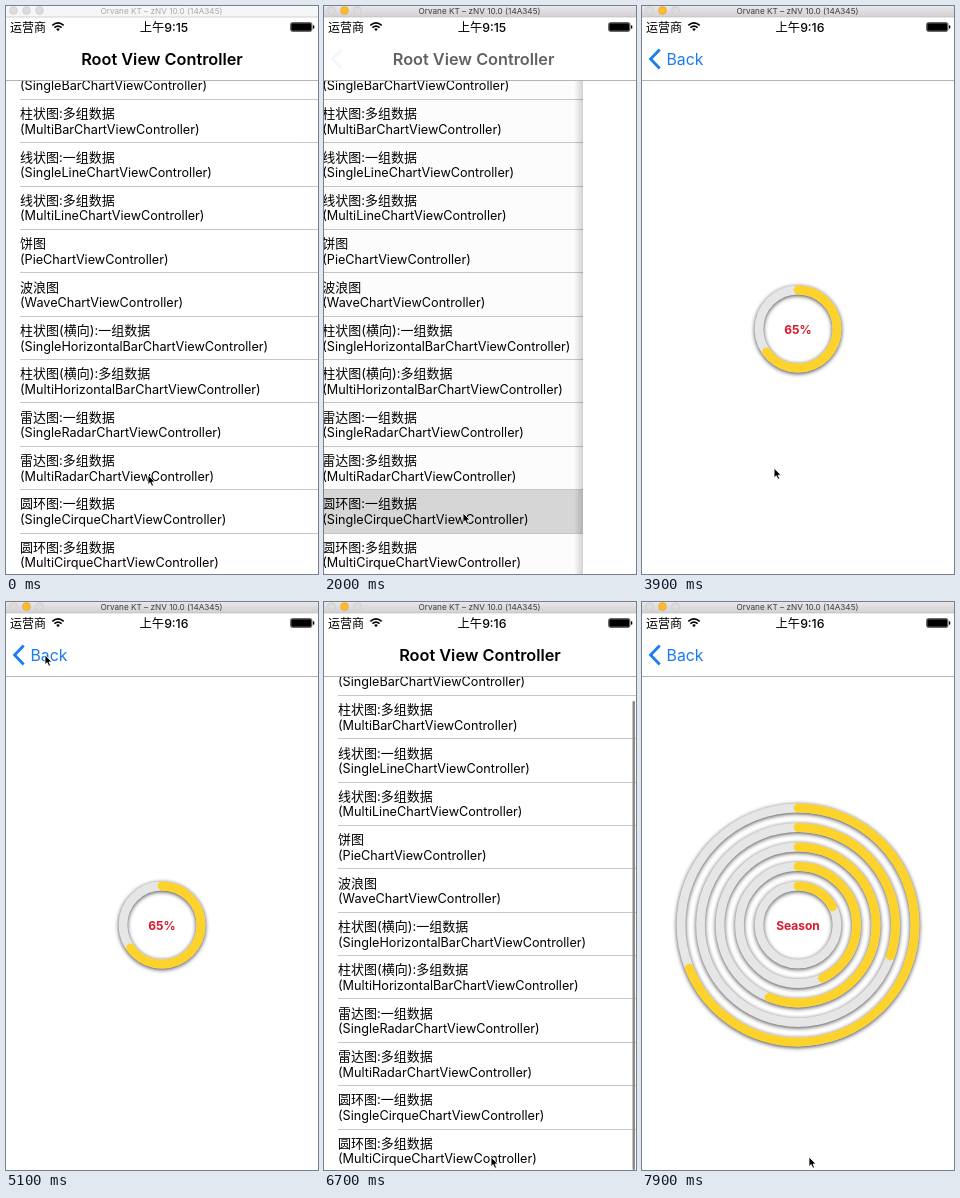
An HTML page that plays this animation: 312x568 px, repeating every 8 s.

```html
<!DOCTYPE html>
<html lang="zh">
<head>
<meta charset="utf-8">
<style>
html, body { margin: 0; width: 100%; height: 100%; overflow: hidden; background: #fff; }
svg { display: block; font-family: Inter, "Noto Sans CJK SC", "Noto Sans CJK", sans-serif; }
.mid { text-anchor: middle; }
.ring { filter: drop-shadow(.8px 1.5px 2px #000b); }
</style>
</head>
<body>
<svg id="stage" width="312" height="568" viewBox="0 0 312 568">
  <defs>
    <linearGradient id="edge"><stop stop-color="#000" stop-opacity="0"/><stop offset="1" stop-color="#000" stop-opacity=".2"/></linearGradient>
    <linearGradient id="chrome" x2="0" y2="1"><stop stop-color="#e9e7e9"/><stop offset="1" stop-color="#d2d0d2"/></linearGradient>
  </defs>
  <rect width="312" height="568" fill="#fff"/>
  <g id="list"><rect id="mark" width="312" height="43.4" fill="#d9d9d9"/></g>
  <rect id="dim" y="74" width="312" height="494"/>
  <rect id="bar" x="308.5" y="99" width="2.5" height="469" rx="1.2" fill="#8b8b8f"/>
  <g id="page">
    <rect id="shade" x="-9" y="74" width="9" height="494" fill="url(#edge)"/>
    <rect y="74" width="312" height="494" fill="#fff"/>
    <g id="single"></g>
    <g id="multi"></g>
    <text id="label" class="mid" x="156" y="328" font-size="12" font-weight="700" fill="#d9182b"></text>
  </g>
  <rect width="312" height="74" fill="#fff"/>
  <path d="M0 74.5H312" stroke="#b4b4b6"/>
  <text id="title" class="mid" x="156" y="58.7" font-size="16.3" font-weight="600">Root View Controller</text>
  <path id="chevron" d="M17.7 43.5L8.6 53L17.7 62.5" fill="none" stroke="#1a7cf0" stroke-width="2.8"/>
  <text id="back" x="24.5" y="58.8" font-size="15.8" fill="#1a7cf0">Back</text>
  <text x="4" y="25.6" font-size="12">运营商</text>
  <g fill="none" stroke="#000" stroke-width="1.7">
    <path d="M46.3 19.3Q52 14.6 57.7 19.3M48.4 21.7Q52 18.7 55.6 21.7"/>
    <path d="M50.2 23L52 25.3L53.8 23Q52 21.6 50.2 23Z" fill="#000" stroke="none"/>
  </g>
  <text id="clock" class="mid" x="158" y="25.6" font-size="12.3" font-weight="500"></text>
  <rect x="284.5" y="16.5" width="21.5" height="9" rx="2" fill="#666" stroke="#555" stroke-width=".8"/>
  <rect x="285.5" y="17.5" width="19.5" height="7" rx="1"/>
  <rect x="306.9" y="19.3" width="1.4" height="3.4" rx=".7"/>
  <rect id="chromeBar" width="312" height="11"/>
  <path d="M0 11H312" stroke="#b9b8b9" stroke-width=".6"/>
  <g stroke-width=".6">
    <circle cx="7.5" cy="4.5" r="3.9" fill="#dcdcdc" stroke="#c6c6c6"/>
    <circle id="yellow" cx="20.5" cy="4.5" r="3.9"/>
    <circle cx="33.5" cy="4.5" r="3.9" fill="#dcdcdc" stroke="#c6c6c6"/>
  </g>
  <text id="caption" class="mid" x="155.5" y="7.5" font-size="8.2">Orvane KT – zNV 10.0 (14A345)</text>
  <path id="cursor" d="M0 0V9.6L2.2 7.6L3.8 11.2L5.5 10.4L4 7H7Z" stroke="#fff" stroke-width=".8"/>
</svg>
<script>
const $ = id => document.getElementById(id);
const clamp = x => Math.min(1, Math.max(0, x));
const set = (id, attrs) => { for (const k in attrs) $(id).setAttribute(k, attrs[k]); };
const add = (id, markup) => $(id).insertAdjacentHTML('beforeend', markup);

const LOOP = 8000, STEP = 100, PUSH1 = 1954, POP = 5538, PUSH2 = 7340;
const ROW = 43.36, TOP = 50.1, SCALE = .975;

const rows = [
  ['柱状图:一组数据', 'SingleBar'], ['柱状图:多组数据', 'MultiBar'],
  ['线状图:一组数据', 'SingleLine'], ['线状图:多组数据', 'MultiLine'],
  ['饼图', 'Pie'], ['波浪图', 'Wave'],
  ['柱状图(横向):一组数据', 'SingleHorizontalBar'], ['柱状图(横向):多组数据', 'MultiHorizontalBar'],
  ['雷达图:一组数据', 'SingleRadar'], ['雷达图:多组数据', 'MultiRadar'],
  ['圆环图:一组数据', 'SingleCirque'], ['圆环图:多组数据', 'MultiCirque']
];
rows.forEach(([name, kind], i) => {
  const y = TOP + i * ROW;
  add('list', `<text x="14" y="${y + 18.7}" font-size="13">${name}</text>
    <text x="14" y="${y + 34.3}" font-size="12.65">(${kind}ChartViewController)</text>
    <path d="M14 ${Math.floor(y + ROW) + .5}H320" stroke="#c8c7cc"/>`);
});

// Rings grow outwards from the label; values are percentages.
const charts = { single: [65], multi: [20, 50, 65, 35, 80] };
for (const id in charts) charts[id].forEach((v, i) => {
  const circle = (color, extra) => `<circle r="${40 + i * 20}" fill="none" stroke="${color}" stroke-width="9" ${extra}/>`;
  add(id, `<g class="ring"><g transform="translate(156 323) rotate(-90) scale(${SCALE})">
    ${circle('#e6e6e6', '')}${circle('#fdd32b', 'class="arc" pathLength="100" stroke-linecap="round"')}</g></g>`);
});

const path = [
  [0, 142, 469], [300, 142, 469], [800, 146, 534], [1000, 145, 534], [1500, 139, 507],
  [3200, 139, 507], [3700, 138, 482], [4500, 100, 355], [5000, 39, 53], [5500, 39, 53],
  [5800, 46, 73], [6400, 150, 500], [6600, 167, 555], [LOOP, 167, 555]
];
function pointer(t) {
  const i = path.findIndex(p => p[0] > t), [t0, x0, y0] = path[i - 1], [t1, x1, y1] = path[i];
  const k = (t - t0) / (t1 - t0), e = k * k * (3 - 2 * k);
  return `translate(${x0 + (x1 - x0) * e} ${y0 + (y1 - y0) * e})`;
}

// Critically damped spring used by the navigation slide.
const spring = ms => { const x = Math.max(0, ms) * .016; return 1 - (1 + x) * Math.exp(-x); };

function draw(t) {
  const second = t >= PUSH2, popping = t >= POP && !second;
  const since = t - (second ? PUSH2 : popping ? POP : PUSH1);
  const p = popping ? 1 - spring(since) : spring(since);

  // Sliding views, snapped to whole pixels
  const left = Math.round(312 * (1 - p));
  set('list', { transform: `translate(${-93.6 * p} 0)` });
  set('page', { transform: `translate(${left} 0)`, visibility: left < 312 ? 'visible' : 'hidden' });
  set('dim', { opacity: .08 * p });
  set('shade', { opacity: popping ? p : 1 - p });

  // Selected row
  const late = t >= 7300;
  const mark = late || (t >= 1800 && t < POP) ? 1 : popping ? 1 - clamp((since - 130) / 350) : 0;
  set('mark', { y: TOP + (late ? 11 : 10) * ROW, opacity: mark });
  set('bar', { opacity: clamp((t - 6400) / 200) * clamp((7300 - t) / 200) });

  // Navigation bar
  const fade = popping ? clamp((since - 230) / 160) : 1 - clamp(since / 120);
  set('title', { opacity: fade, x: 156 - (popping ? 56 : 38) * p });
  const pressed = t >= 5400 && t < POP ? .3 : 1;
  set('chevron', { opacity: p ** 1.6 * pressed });
  set('back', {
    opacity: pressed * (popping ? .3 * (1 - clamp(since / 150)) : clamp((since - 150) / 250)),
    x: 24.5 + 60 * (1 - p)
  });

  // Chart
  const k = clamp((t - (second ? PUSH2 : PUSH1)) / 890), grow = 1 - (1 - k) ** 2;
  const chart = second ? 'multi' : 'single';
  for (const id in charts) {
    set(id, { display: id === chart ? 'inline' : 'none' });
    $(id).querySelectorAll('.arc').forEach((arc, i) =>
      arc.setAttribute('stroke-dasharray', `${charts[id][i] * grow} 200`));
  }
  $('label').textContent = second ? 'Season' : '65%';

  // Window
  const active = t >= 900;
  set('chromeBar', { fill: active ? 'url(#chrome)' : '#f6f6f6' });
  set('yellow', { fill: active ? '#fdbc2e' : '#dcdcdc', stroke: active ? '#dfa023' : '#c6c6c6' });
  set('caption', { fill: active ? '#3c3c3c' : '#a9a9a9' });
  $('clock').textContent = t < 3800 ? '上午9:15' : '上午9:16';
  set('cursor', { transform: pointer(t) });
}

function frame() {
  draw(Math.floor(performance.now() % LOOP / STEP) * STEP);
  requestAnimationFrame(frame);
}
frame();
</script>
</body>
</html>
```
